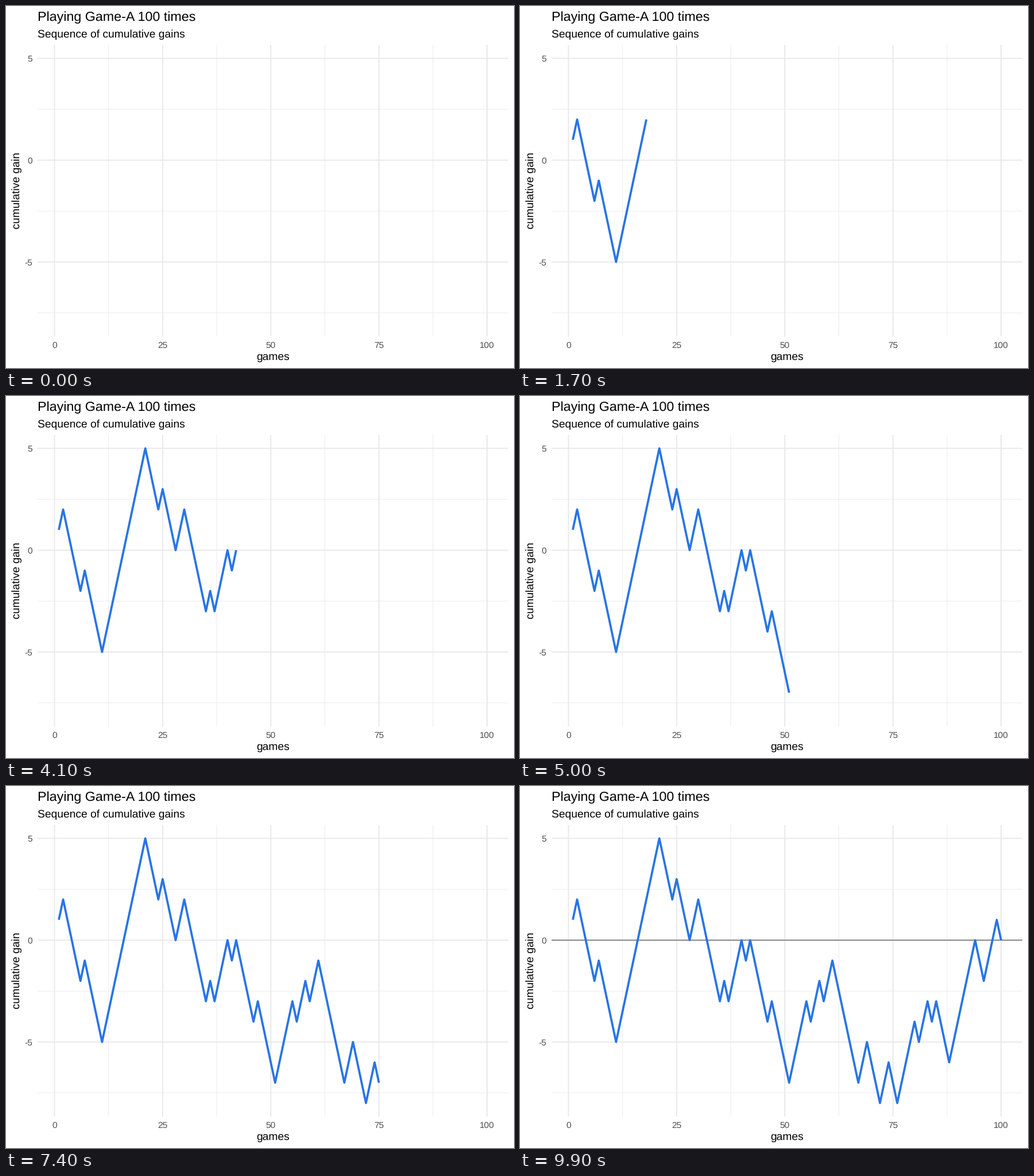
Recreate the animation shown at these times as a matplotlib script. Size 885 px wide and 632 px high, loop 10 s.

```python
import matplotlib.pyplot as plt
import numpy as np
from matplotlib.animation import FuncAnimation

W, H, DPI = 885, 632, 64
PT = 72 / DPI  # points per pixel
BLUE, GRID, MINOR, ZERO, TICK = "#2874e5", "#e8e8e8", "#ebebeb", "#7f7f7f", "#4d4d4d"
LEFT, RIGHT, TOP, BOTTOM = 54.7, 875.4, 68.3, 576.7
GAMES = 100

plt.rcParams.update({
    "font.family": "Liberation Sans",
    "text.hinting": "none",
    "path.simplify": False,
})

# The walk starts by winning and reverses after each of these games.
turns = [2, 6, 7, 11, 21, 24, 25, 28, 30, 35, 36, 37, 40, 41, 42, 46, 47, 51, 55,
         56, 58, 59, 61, 67, 69, 72, 74, 76, 80, 81, 83, 84, 85, 88, 94, 96, 99]
games = np.arange(1, GAMES + 1)
gains = np.cumsum((-1) ** np.searchsorted(turns, games))

fig = plt.figure(figsize=(W / DPI, H / DPI), dpi=DPI, facecolor="white")
ax = fig.add_axes([LEFT / W, 1 - BOTTOM / H, (RIGHT - LEFT) / W, (BOTTOM - TOP) / H])
ax.set_xlim(1 - 4.95, 100 + 4.95)
ax.set_ylim(-8 - 0.65, 5 + 0.65)
ax.axis("off")


def grid(xs, ys, color, width):
    style = dict(color=color, lw=width * PT, snap=False, zorder=1)
    for y in ys:
        ax.axhline(y, **style)
    for x in xs:
        ax.axvline(x, **style)


def label(x, y, text, size, color="black", **kw):
    """Place text with its baseline at pixel (x, y) from the top left."""
    fig.text(x / W, 1 - y / H, text, fontsize=size * PT, color=color,
             va="baseline", rotation_mode="anchor", **kw)


x_ticks, y_ticks = range(0, 101, 25), (-5, 0, 5)
grid(np.arange(12.5, 100, 25), (-7.5, -2.5, 2.5), MINOR, 0.94)
grid(x_ticks, y_ticks, GRID, 1.87)

label(LEFT, 26.4, "Playing Game-A 100 times", 23.2)
label(LEFT, 55, "Sequence of cumulative gains", 19.3)
label((LEFT + RIGHT) / 2, 618.4, "games", 19.3, ha="center")
label(23.6, (TOP + BOTTOM) / 2, "cumulative gain", 19.3, ha="center", rotation=90)
for x in x_ticks:
    label(84.45 + 7.536 * x, 596.5, str(x), 15.45, TICK, ha="center")
for y in y_ticks:
    label(46, 274.8 - 35.55 * y, str(y), 15.45, TICK, ha="right")

zero = ax.axhline(0, color=ZERO, lw=1.87 * PT, snap=False, zorder=2)
walk, = ax.plot([], [], color=BLUE, lw=3.75 * PT, solid_capstyle="butt",
                solid_joinstyle="round", snap=False, zorder=3)


def update(i):
    n = i + 1 if i else 0  # a single game has no line yet
    walk.set_data(games[:n], gains[:n])
    zero.set_visible(i == GAMES - 1)
    return walk, zero


anim = FuncAnimation(fig, update, frames=GAMES, interval=100, repeat=True,
                     repeat_delay=0, blit=False)
plt.show()
```
